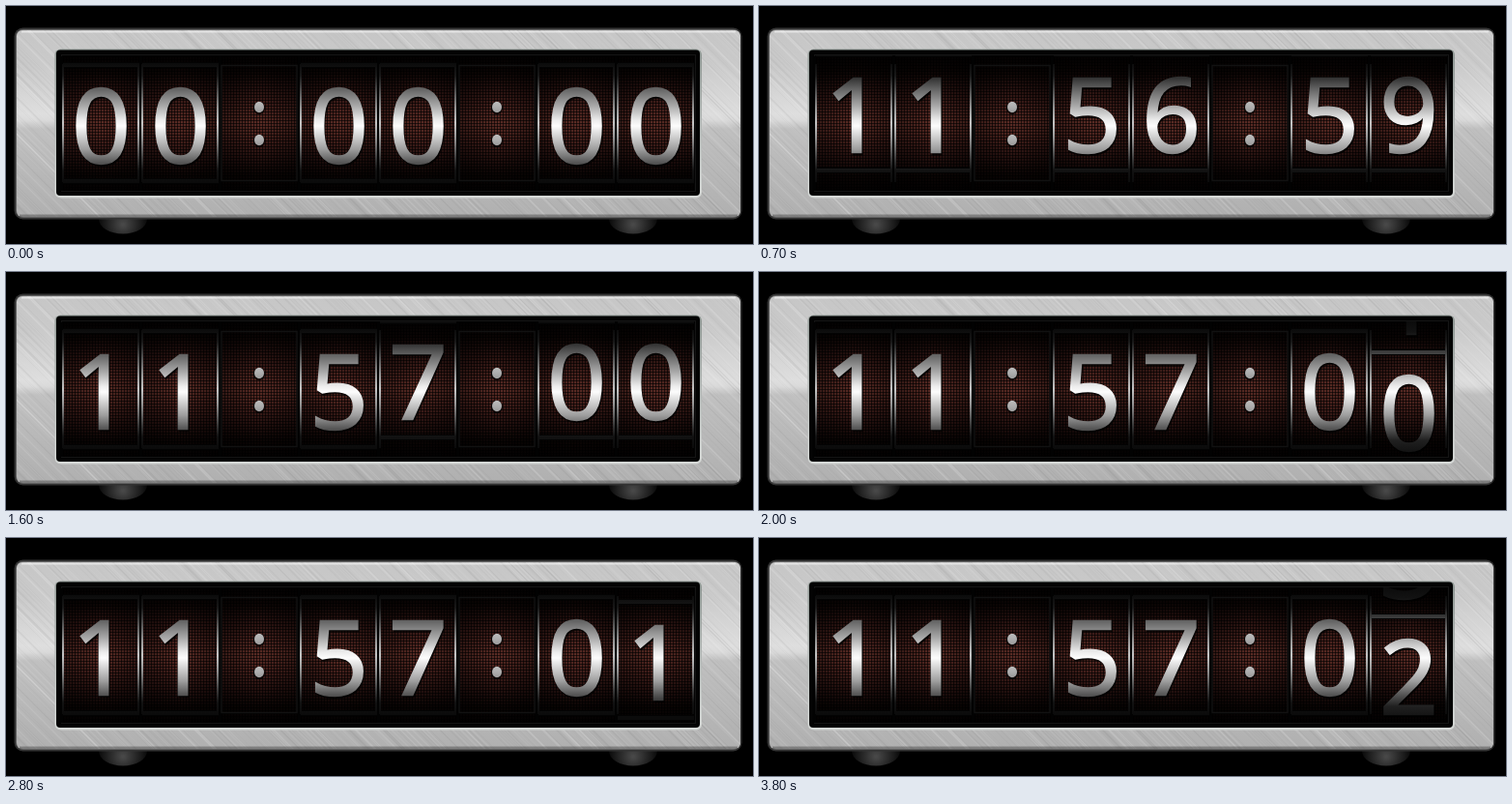
Write an HTML page with a canvas that moves like this. It is 773 by 246 pixels and loops after 3900 ms.

```html
<!DOCTYPE html>
<html lang="en">
<head>
<meta charset="utf-8">
<title>Rolling clock</title>
<style>
  html, body { margin: 0; width: 100%; height: 100%; overflow: hidden; background: #000; }
  canvas { display: block; }
</style>
</head>
<body>
<canvas id="stage" width="773" height="246"></canvas>
<script>
const W = 773, H = 246, LOOP = 3900, STEP = 100;
const PITCH = 82, FIRST_X = 59, CELL_W = 79;
const CELL_TOP = 61, CELL_H = 120;
const ctx = document.getElementById('stage').getContext('2d');

const readings = ['00:00:00', '11:56:59', '11:57:00', '11:57:01', '11:57:02', '11:57:03'];
// Start of each roll in ms.
const rolls = [32, 924, 1862, 2769, 3680];
const SPEED = 0.163, STICK = 4;

const gray = v => `rgb(${v},${v},${v})`;

function vertical(c, y0, y1, stops) {
  const g = c.createLinearGradient(0, y0, 0, y1);
  for (const [y, color] of stops) g.addColorStop((y - y0) / (y1 - y0), color);
  return g;
}

function roundBox(c, x, y, w, h, r, fill) {
  c.beginPath();
  c.roundRect(x, y, w, h, r);
  c.fillStyle = fill;
  c.fill();
}

function layer(paint) {
  const canvas = document.createElement('canvas');
  canvas.width = W;
  canvas.height = H;
  paint(canvas.getContext('2d'));
  return canvas;
}

function seeded(seed) {
  return () => (seed = (seed * 16807) % 2147483647) / 2147483647;
}

// Light falls on the middle of the drum, whatever rolls past it.
const digitLight = vertical(ctx, 48, 194, [
  [48, gray(10)], [62, gray(18)], [74, gray(48)], [86, gray(100)], [104, gray(172)], [118, gray(236)],
  [124, gray(252)], [130, gray(228)], [148, gray(158)], [163, gray(80)], [174, gray(32)], [194, gray(9)]
]);
const edgeLight = vertical(ctx, 60, 182, [
  [60, gray(12)], [72, gray(24)], [84, gray(66)], [106, gray(150)], [121, gray(196)],
  [136, gray(150)], [158, gray(58)], [170, gray(18)], [182, gray(11)]
]);

function paintFoot(c, x) {
  const g = c.createRadialGradient(x, 226, 1, x, 224, 25);
  g.addColorStop(0, gray(72));
  g.addColorStop(1, gray(10));
  c.save();
  c.beginPath();
  c.rect(x - 30, 219, 60, 20);
  c.clip();
  c.beginPath();
  c.ellipse(x, 220, 25, 15.5, 0, 0, 7);
  c.fillStyle = g;
  c.fill();
  c.restore();
}

function paintMetal(c) {
  const rnd = seeded(41);
  roundBox(c, 11, 25, 749, 193, 6, vertical(c, 25, 218, [
    [25, gray(198)], [60, gray(202)], [112, gray(222)], [118, gray(218)], [127, gray(192)], [160, gray(186)], [218, gray(176)]
  ]));
  c.save();
  c.clip();
  for (let i = 0; i < 520; i++) {
    const x = rnd() * 950 - 190;
    c.strokeStyle = rnd() < 0.5 ? `rgba(255,255,255,${rnd() * 0.13})` : `rgba(80,80,80,${rnd() * 0.07})`;
    c.lineWidth = 0.7 + rnd();
    c.beginPath();
    c.moveTo(x, 24);
    c.lineTo(x + 195, 219);
    c.stroke();
  }
  c.restore();
}

const casing = layer(c => {
  c.fillStyle = '#000';
  c.fillRect(0, 0, W, H);
  paintFoot(c, 121);
  paintFoot(c, 649);
  roundBox(c, 8.5, 22.5, 753, 198, 9, gray(50));
  roundBox(c, 10, 24, 750, 195, 8, gray(96));
  paintMetal(c);
  c.fillStyle = 'rgba(255,255,255,.5)';
  c.fillRect(16, 26, 739, 1.5);
  c.fillStyle = 'rgba(50,50,50,.4)';
  c.fillRect(14, 215.5, 743, 2.5);
  roundBox(c, 50.5, 44.5, 669.5, 154, 6, vertical(c, 44, 199, [[44, '#8d9692'], [122, '#b4b9b7'], [199, '#d6d9d7']]));
  roundBox(c, 52, 45.5, 666, 150.5, 4, '#030303');
  c.strokeStyle = gray(20);
  c.strokeRect(57.5, 50.5, 656, 141);
});

function paintMesh(c, x) {
  c.fillStyle = vertical(c, 52, 191, [
    [52, '#040202'], [68, '#0b0504'], [86, '#281210'], [108, '#4c231e'], [121, '#5c2c25'],
    [134, '#4c231e'], [156, '#281210'], [174, '#0b0504'], [191, '#040202']
  ]);
  c.fillRect(x, 52, CELL_W, 139);
  const sides = c.createLinearGradient(x, 0, x + CELL_W, 0);
  sides.addColorStop(0, 'rgba(0,0,0,.4)');
  sides.addColorStop(0.5, 'rgba(0,0,0,0)');
  sides.addColorStop(1, 'rgba(0,0,0,.4)');
  c.fillStyle = sides;
  c.fillRect(x, 52, CELL_W, 139);
  c.fillStyle = 'rgba(0,0,0,.6)';
  for (let i = 0; i < CELL_W; i += 3) c.fillRect(x + i, 52, 1, 139);
  for (let y = 52; y < 191; y += 3) c.fillRect(x, y, CELL_W, 1);
}

const mesh = layer(c => {
  for (let i = 0; i < 8; i++) paintMesh(c, FIRST_X + i * PITCH);
});

const rails = layer(c => {
  for (let i = 0; i < 8; i++) {
    const x = FIRST_X + i * PITCH;
    const colon = i === 2 || i === 5;
    c.fillStyle = '#020202';
    c.fillRect(x - 3, 52, 3, 139);
    if (colon) {
      c.strokeStyle = gray(17);
      c.lineWidth = 1.5;
      c.strokeRect(x, 61.5, CELL_W - 1, 119);
    } else {
      c.fillStyle = edgeLight;
      c.fillRect(x - 1, 60, 2, 122);
      c.fillRect(x + CELL_W - 2, 60, 2, 122);
    }
  }
});

function colonDot(x, y) {
  ctx.beginPath();
  ctx.ellipse(x, y + 1, 6, 6.5, 0, 0, 7);
  ctx.fillStyle = 'rgba(0,0,0,.75)';
  ctx.fill();
  ctx.beginPath();
  ctx.ellipse(x, y, 5, 5.7, 0, 0, 7);
  ctx.fillStyle = vertical(ctx, y - 6, y + 6, [[y - 6, gray(190)], [y + 6, gray(155)]]);
  ctx.fill();
}

function inkDigit(digit, x, y, paint) {
  ctx.fillStyle = ctx.strokeStyle = paint;
  ctx.fillText(digit, x, y);
  ctx.strokeText(digit, x, y);
}

function drawDigit(digit, cx, shift) {
  const y = 161.5 + shift;
  inkDigit(digit, cx + 1, y + 2, 'rgba(0,0,0,.7)');
  inkDigit(digit, cx, y, digitLight);
}

function drawReel(x, from, to, offset) {
  const cx = x + CELL_W / 2;
  ctx.save();
  ctx.beginPath();
  ctx.rect(x, 51, CELL_W, 141);
  ctx.clip();
  drawDigit(from, cx, offset);
  if (offset) drawDigit(to, cx, offset - CELL_H);
  // Seams between neighbouring faces travel with the drum.
  for (const seam of [CELL_TOP + offset, CELL_TOP + offset - CELL_H, CELL_TOP + offset + CELL_H]) {
    ctx.fillStyle = '#030303';
    ctx.fillRect(x, seam - 3, CELL_W, 6);
    ctx.fillStyle = edgeLight;
    ctx.fillRect(x, seam - 2, CELL_W, 4);
  }
  ctx.restore();
}

function stateAt(t) {
  let index = 0;
  while (index < rolls.length - 1 && t >= rolls[index + 1]) index++;
  const raw = Math.max(0, (t - rolls[index]) * SPEED);
  const offset = raw < STICK ? 0 : Math.round(raw);
  if (raw >= CELL_H) return { from: readings[index + 1], to: readings[index + 1], offset: 0 };
  return { from: readings[index], to: readings[index + 1], offset };
}

function draw(time) {
  const { from, to, offset } = stateAt(Math.floor((time % LOOP) / STEP) * STEP);
  ctx.drawImage(casing, 0, 0);
  ctx.drawImage(mesh, 0, 0);
  ctx.font = '106px "Open Sans", sans-serif';
  ctx.textAlign = 'center';
  ctx.textBaseline = 'alphabetic';
  ctx.lineJoin = 'miter';
  ctx.miterLimit = 3;
  ctx.lineWidth = 2.4;
  for (let i = 0; i < 8; i++) {
    const x = FIRST_X + i * PITCH;
    if (from[i] === ':') {
      colonDot(x + 39, 104.5);
      colonDot(x + 39, 138.5);
    } else {
      drawReel(x, from[i], to[i], from[i] === to[i] ? 0 : offset);
    }
  }
  ctx.drawImage(rails, 0, 0);
}

const start = performance.now();
function tick() {
  draw(performance.now() - start);
  requestAnimationFrame(tick);
}
tick();
</script>
</body>
</html>
```
